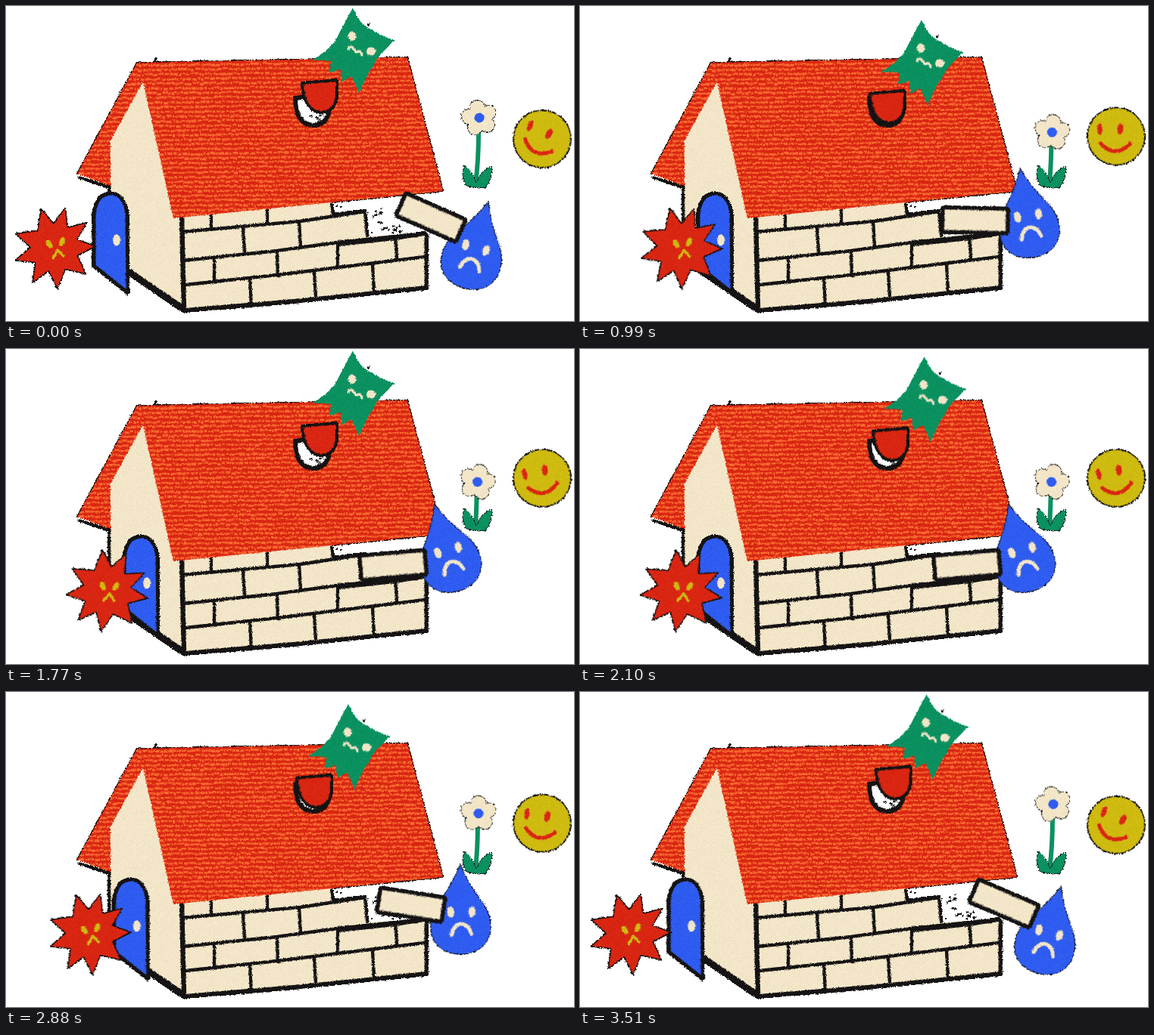
Write an HTML page with a canvas that moves like this. It is 750 by 417 pixels and loops after 3540 ms.

```html
<!DOCTYPE html>
<html lang="en">
<head>
<meta charset="utf-8">
<title>House under construction</title>
<style>
html, body { margin: 0; width: 100%; height: 100%; overflow: hidden; background: #fff; }
canvas { display: block; width: 750px; height: 417px; }
</style>
</head>
<body>
<canvas id="stage" width="750" height="417"></canvas>
<script>
const start = performance.now();
const INK = '#151313', CREAM = '#f3e6c8', RED = '#d92612', ORANGE = '#fa6a30';
const BLUE = '#2f5cf0', GREEN = '#0b9160', GOLD = '#cfba10';
const LOOP = 3540, STEP = 30;
const stage = document.getElementById('stage').getContext('2d');

let seed = 7;
const rand = () => (seed = (seed * 16807) % 2147483647) / 2147483647;
const spread = a => (rand() * 2 - 1) * a;

// Shift every pixel a little and harden its edge, for a rough print look.
function roughen(c, w, h, amount) {
  const src = c.getImageData(0, 0, w, h), out = c.createImageData(w, h);
  for (let y = 0; y < h; y++) for (let x = 0; x < w; x++) {
    const sx = Math.min(w - 1, Math.max(0, Math.round(x + spread(amount))));
    const sy = Math.min(h - 1, Math.max(0, Math.round(y + spread(amount))));
    const i = (sy * w + sx) * 4, o = (y * w + x) * 4, grain = spread(6);
    for (let k = 0; k < 3; k++) out.data[o + k] = src.data[i + k] + grain;
    out.data[o + 3] = src.data[i + 3] > 110 ? 255 : 0;
  }
  c.putImageData(out, 0, 0);
}

// A sprite is drawn in stage coordinates and turns about the centre of its box.
function sprite(x, y, w, h, draw, amount = 0.65) {
  const canvas = document.createElement('canvas');
  canvas.width = w;
  canvas.height = h;
  const c = canvas.getContext('2d');
  c.lineCap = c.lineJoin = 'round';
  c.translate(-x, -y);
  draw(c);
  roughen(c, w, h, amount);
  return { canvas, x: x + w / 2, y: y + h / 2, w, h };
}

function place(s, dx, dy, deg = 0) {
  stage.save();
  stage.translate(s.x + dx, s.y + dy);
  stage.rotate(deg * Math.PI / 180);
  stage.drawImage(s.canvas, -s.w / 2, -s.h / 2);
  stage.restore();
}

function shape(c, d, fill, line, width) {
  const p = new Path2D(d);
  if (fill) { c.fillStyle = fill; c.fill(p); }
  if (line) { c.strokeStyle = line; c.lineWidth = width; c.stroke(p); }
}

function oval(c, x, y, rx, ry, fill, deg = 0, line = 0) {
  c.beginPath();
  c.ellipse(x, y, rx, ry, deg * Math.PI / 180, 0, 7);
  c.fillStyle = fill;
  c.fill();
  if (line) { c.strokeStyle = INK; c.lineWidth = line; c.stroke(); }
}

function specks(c, x, y, w, h, n) {
  c.fillStyle = INK;
  for (let i = 0; i < n; i++) c.fillRect(x + rand() * w, y + rand() * h, 1 + rand() * 4, 1 + rand() * 2);
}

const house = sprite(0, 0, 750, 417, c => {
  // Side wall
  shape(c, 'M181 100L224 281L233 281L236 402L137 336L138 178Z', CREAM);
  shape(c, 'M136 238L137 336', null, INK, 4);
  shape(c, 'M139 336L235 402', null, INK, 9);
  // Brick wall
  shape(c, 'M232 276L431 258L432 276L474 272L478 305L555 301L555 373L237 403Z', CREAM);
  shape(c, 'M233 299L388 285L474 272L477 304M234 337L358 324L437 313L553 301M237 369L358 356L553 332' +
    'M271 272V295M345 265V288M430 260L432 276L474 271M313 292L315 329M387 285L389 318' +
    'M275 334V366M358 325L359 357M438 314V346M514 305L516 334M322 363L324 397M407 352L409 386M484 343L486 377',
    null, INK, 4.3);
  shape(c, 'M439 315L514 307L552 301', null, INK, 6);
  shape(c, 'M232 280L235 402', null, INK, 6.5);
  shape(c, 'M236 403L380 391L555 373', null, INK, 6);
  shape(c, 'M555 303V373', null, INK, 5);
  specks(c, 482, 290, 40, 10, 16);
  specks(c, 476, 262, 18, 26, 9);
  specks(c, 434, 264, 8, 3, 3);
  // Roof
  shape(c, 'M97 227L137 240', null, INK, 4);
  shape(c, 'M198 69L196 75', null, INK, 3);
  const roof = 'M173 75L530 68L577 245L221 281L181 100L138 178V238L94 222Z';
  shape(c, 'M94 222L173 75L530 68L577 245L430 260', null, INK, 2.2);
  shape(c, roof, RED);
  c.save();
  c.clip(new Path2D(roof));
  c.fillStyle = ORANGE;
  for (let y = 72; y < 290; y += 6.2) {
    for (let x = 90; x < 580;) {
      const w = 2 + rand() * 5;
      c.fillRect(x, y - (x - 90) * 0.012 + spread(0.9), w, 2 + rand() * 1.5);
      x += w + rand() * 1.8;
    }
  }
  c.restore();
  // Window opening
  shape(c, 'M382 122L427 117Q432 158 405 158Q382 156 382 122Z', '#fff', INK, 6);
  specks(c, 398, 143, 24, 10, 15);
});

const cover = sprite(384, 90, 62, 60, c =>
  shape(c, 'M391 102L437 98L437 117Q436 140 416 141Q393 139 391 102Z', RED, INK, 4));

const door = sprite(106, 238, 66, 152, c => {
  shape(c, 'M116 344L116 276Q119 249 138 248Q157 249 160 276L161 380Z', BLUE, INK, 5);
  oval(c, 146, 310, 5, 7.5, CREAM);
});

const star = sprite(4, 260, 120, 120, c => {
  const tips = [-19, 15, 52, 88, 130, 176, 212, 252, 290];
  const at = (deg, r) => {
    const a = deg * Math.PI / 180;
    return (64 + r * Math.sin(a)).toFixed(1) + ' ' + (320 - r * Math.cos(a)).toFixed(1);
  };
  const pts = tips.flatMap((a, i) => {
    const next = i < tips.length - 1 ? tips[i + 1] : tips[0] + 360;
    return [at(a, 54.5), at((a + next) / 2, 32)];
  });
  shape(c, 'M' + pts.join('L') + 'Z', RED, INK, 1.5);
  oval(c, 57, 315, 3.5, 6, GOLD, -35);
  oval(c, 74, 312, 3.5, 6, GOLD, 25);
  shape(c, 'M62 334L68 323L76 331', null, GOLD, 3.5);
});

const ghost = sprite(400, 0, 120, 120, c => {
  shape(c, 'M458 4Q466 24 480 31Q494 40 512 46Q491 64 486 76Q474 94 466 114L457 92L444 99L442 82' +
    'L428 87L430 72L407 71Q432 56 440 38Q449 20 458 4Z', GREEN, GREEN, 1.6);
  oval(c, 457, 40, 5.5, 6, CREAM);
  oval(c, 482, 60, 6, 5.5, CREAM);
  shape(c, 'M452 57Q455 51 459 57Q462 63 465 60Q468 59 470 65', null, CREAM, 3.2);
  specks(c, 474, 22, 4, 2, 2);
});

const drop = sprite(565, 245, 100, 180, c => {
  shape(c, 'M615 255Q622 275 640 301C669 337 653 375 615 375C577 375 561 337 590 301Q608 275 615 255Z',
    BLUE, INK, 1);
  oval(c, 602, 319, 4.5, 7.5, CREAM, -8);
  oval(c, 630, 319, 4.5, 7.5, CREAM, 8);
  shape(c, 'M603 349Q606 335 616 335Q626 336 629 348', null, CREAM, 5);
});

const brick = sprite(511, 250, 100, 60, c =>
  shape(c, 'M518 264H604V296H518Z', CREAM, INK, 5));

const head = sprite(595, 118, 60, 60, c => {
  const petals = (r, fill) => {
    for (let i = 0; i < 5; i++) {
      const a = (i * 72 - 12) * Math.PI / 180;
      oval(c, 625 + 14 * Math.sin(a), 148 - 14 * Math.cos(a), r, r, fill);
    }
  };
  petals(10.3, INK);
  petals(9.6, CREAM);
  oval(c, 625, 148, 9, 9, CREAM);
  oval(c, 625, 148, 6.5, 6.5, BLUE);
});

const leaves = sprite(596, 205, 54, 42, c =>
  shape(c, 'M620 232Q614 215 605 211Q600 226 607 237Q614 242 634 240Q642 228 642 212Q627 217 622 232Z',
    GREEN, INK, 0.8));

const smile = sprite(665, 133, 86, 86, c => {
  oval(c, 708, 176, 38, 38, GOLD, 0, 1.6);
  oval(c, 686, 167, 3.5, 7.5, RED, -4);
  oval(c, 713, 166, 4, 7.5, RED, 4);
  shape(c, 'M688 186Q707 206 727 185', null, RED, 5);
});

// Linear steps of [time, value]
function track(t, keys) {
  for (let i = 1; i < keys.length; i++) {
    const [t0, v0] = keys[i - 1], [t1, v1] = keys[i];
    if (t <= t1) return v0 + (v1 - v0) * (t - t0) / (t1 - t0);
  }
  return keys[keys.length - 1][1];
}

const CARRY = [[0, 0], [1260, 1], [2280, 1], [3540, 0]];
const SWAY = [[0, 0], [1440, 1], [2100, 1], [3540, 0]];
const PUSH = [[0, 0], [830, 1], [2550, 1], [3540, 0]];
const TILT = [[0, 0], [850, 0], [1410, 13], [2100, 12], [2600, 0], [3540, 0]];
const SLIDE = [[0, 0], [750, 1], [930, 1], [1770, 0]];

function render(t) {
  const carry = track(t, CARRY), sway = track(t, SWAY), push = track(t, PUSH);
  const slide = track(t % 1770, SLIDE);

  stage.fillStyle = '#fff';
  stage.fillRect(0, 0, 750, 417);
  place(house, 0, 0);
  place(cover, -9 * slide, 15 * slide);
  place(ghost, -7.5 * slide, 17 * slide);
  place(door, 40 * push, 0);
  place(star, 69.5 * push, 0, track(t, TILT));

  const hx = 625 - 2.5 * sway, hy = 148 + 28 * sway;
  stage.lineCap = 'butt';
  shape(stage, `M${hx - 1} ${hy + 18}Q${hx - 1} 205 620 235`, null, GREEN, 6);
  place(leaves, 0, 0);
  place(head, -2.5 * sway, 28 * sway, 25 * sway);
  place(smile, 0, -5 * sway, 26 - 35 * sway);

  place(drop, -28 * carry, -53 * carry, 16 - 31.5 * carry);
  place(brick, -50 * carry, 6 * carry * carry, 24 - 29 * carry);
}

function tick() {
  const t = (performance.now() - start) % LOOP;
  render(Math.floor(t / STEP) * STEP);
  requestAnimationFrame(tick);
}
tick();
</script>
</body>
</html>
```
